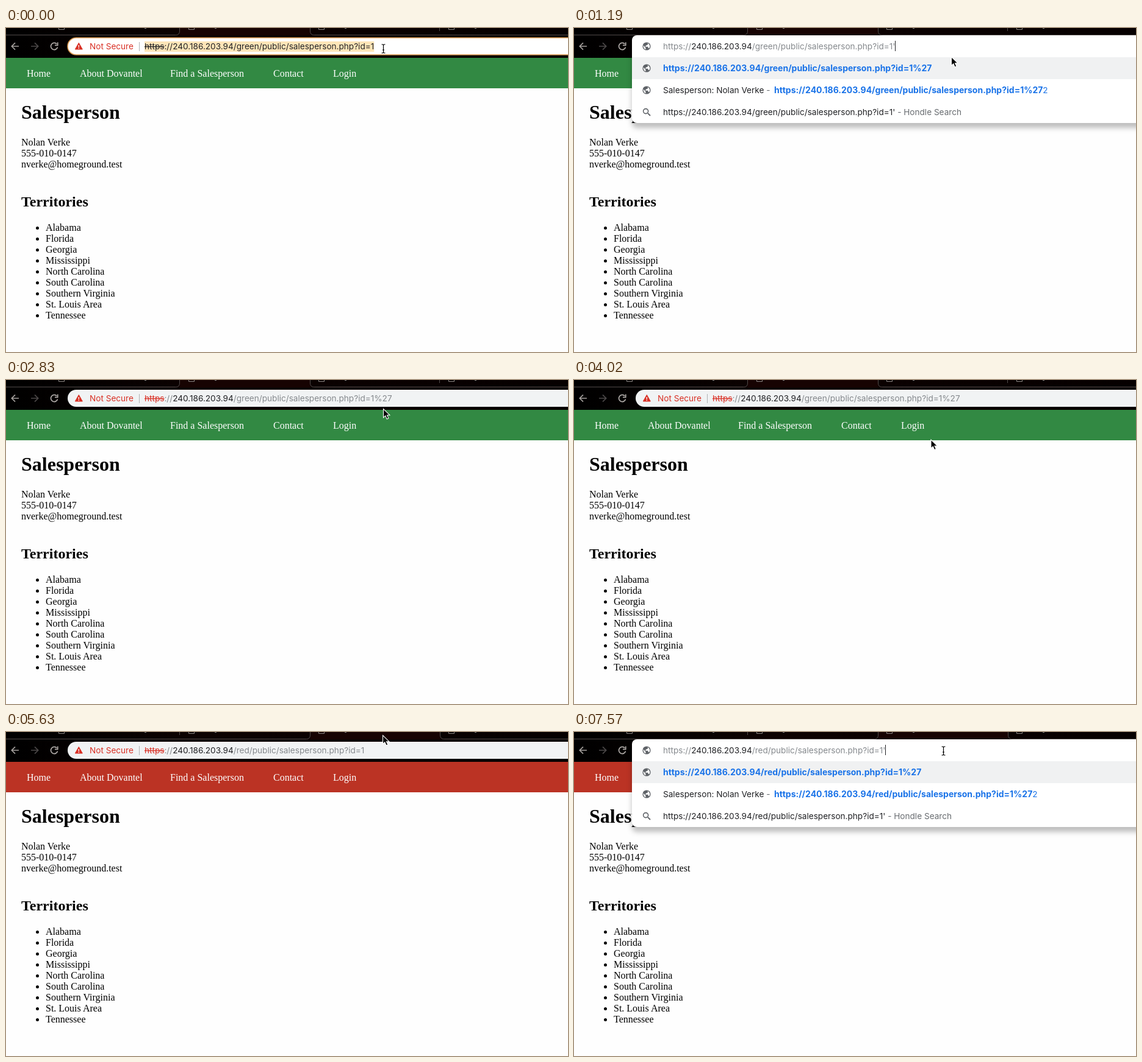
An HTML page for the animation above (8000 ms loop, 921x532 px).

```html
<!DOCTYPE html>
<html lang="en">
<head>
<meta charset="utf-8">
<title>Salesperson</title>
<style>
  html, body { margin: 0; width: 100%; height: 100%; overflow: hidden; background: #fefefe; }
  svg { display: block; }
  text { white-space: pre; }
  .page { font-family: "Liberation Serif", "Times New Roman", serif; font-size: 16px; }
  .ui { font-family: Inter, sans-serif; font-size: 13.6px; }
  .ink { fill: #202124; }
  .dim { fill: #85898d; }
  .note { fill: #686c70; }
  .red { fill: #d93025; }
  .link { fill: #1a73e8; }
  .bold { font-weight: 700; font-size: 14px; }
  .strike { text-decoration: line-through; }
  #popup rect.box { filter: drop-shadow(0 8px 4px rgba(0, 0, 0, .25)); }
</style>
</head>
<body>
<svg width="921" height="532" viewBox="0 0 921 532">
  <defs>
    <linearGradient id="bar">
      <stop offset="0" stop-color="#000"/>
      <stop offset=".35" stop-color="#0d0201"/>
      <stop offset="1" stop-color="#060000"/>
    </linearGradient>
    <g id="globe">
      <circle r="6.6" fill="#5f6368"/>
      <path d="M-5.3 -1.4L-1.6 2.3V5.3C-4 4.7 -5.6 2.4 -5.3 -1.4Z
               M1.6 -5.1C3.6 -4.2 5.3 -2.2 5.3 0C5.3 1.5 4.8 2.7 3.9 3.6
               C3.5 2.9 3.1 2.6 2.4 2.6V.7H-1.9V-.7H-.5V-2H.9C1.6 -2 2 -2.6 2 -3.2Z" fill="#fff"/>
    </g>
  </defs>

  <g id="page" class="page"></g>

  <g id="chrome">
    <rect width="921" height="49" fill="url(#bar)"/>
    <g id="tabs" fill="none" stroke="#504a49"></g>
    <g fill="none" stroke-width="1.7">
      <path d="M21 30H9.5M15 24.3L9.3 30L15 35.7" stroke="#a49f9c"/>
      <path d="M41 30H52.5M47 24.3L52.7 30L47 35.7" stroke="#4c4848"/>
      <path id="reload" d="M83.2 26.2A5.6 5.6 0 1 0 84.5 31.5M84.7 23.6V28.3H80" stroke="#b0aba8"/>
      <path id="stop" d="M73.6 24.6L84.4 35.4M84.4 24.6L73.6 35.4" stroke="#b0aba8"/>
    </g>
  </g>

  <g id="popup" class="ui"></g>

  <g id="pill" class="ui">
    <rect id="field" x="101" y="16" width="850" height="28" rx="14"/>
    <g id="warning">
      <path d="M119.3 24.4L125.3 35H113.3Z" fill="#d93025" stroke="#d93025" stroke-linejoin="round"/>
      <path d="M119.3 28V31.4M119.3 32.5V33.9" stroke="#fff" stroke-width="1.4"/>
      <text class="red" x="137" y="35">Not Secure</text>
      <path d="M218.5 23V38" stroke="#b0b2b5"/>
    </g>
    <g id="info" fill="none" stroke="#5f6368" stroke-width="1.4">
      <circle cx="119" cy="30" r="6"/>
      <path d="M119 29V33.5M119 26.3V27.7"/>
    </g>
    <rect id="selection" x="227" y="22" height="17" fill="#fee5b8"/>
  </g>

  <use id="site" href="#globe" x="119" y="30"/>
  <g class="ui">
    <text id="url" y="35"></text>
    <rect id="caret" y="21" width="1" height="17" fill="#202124"/>
  </g>

  <path id="arrow" d="M0 0V14.2L3.3 11.2L5.7 16.6L8.3 15.4L6 10.2H10.4Z" fill="#000" stroke="#fff" stroke-width="1.1"/>
  <g id="beam" fill="none">
    <path d="M-3 -7H-1L0 -6L1 -7H3M0 -6V6M-3 7H-1L0 6L1 7H3M-1.5 2H1.5" stroke="#fff" stroke-width="2.6" opacity=".75"/>
    <path d="M-3 -7H-1L0 -6L1 -7H3M0 -6V6M-3 7H-1L0 6L1 7H3M-1.5 2H1.5" stroke="#000" stroke-width="1.2"/>
  </g>
</svg>

<script>
const LOOP = 8000;
const HOST = '240.186.203.94';
const PERSON = 'Nolan Verke';
const NAV_COLORS = { green: '#328943', red: '#bb3324' };
const $ = id => document.getElementById(id);

const text = (x, y, body, attrs = '') => `<text x="${x}" y="${y}" ${attrs}>${body}</text>`;
const span = (cls, body) => `<tspan class="${cls}">${body}</tspan>`;
const show = (id, on) => $(id).setAttribute('visibility', on ? 'visible' : 'hidden');
const set = (id, attrs) => {
  for (const name in attrs) $(id).setAttribute(name, attrs[name]);
};

// Each step lists only what changes at that time.
const steps = [
  [0, { site: 'green', mode: 'select', query: '1', popup: 0, caret: 0, busy: 0, cursor: 'beam', at: [618.5, 34] }],
  [140, { mode: 'focus', caret: 1 }],
  [440, { cursor: 'arrow', at: [618.5, 47.5] }],
  [590, { caret: 0 }],
  [1190, { mode: 'type', query: "1'", popup: 1, caret: 1 }],
  [1640, { caret: 0 }],
  [2240, { mode: 'load', query: '1%27', popup: .84, busy: 1 }],
  [2390, { popup: 0 }],
  [2680, { mode: 'rest' }],
  [2830, { busy: 0 }],
  [4020, { at: [585, 98] }],
  [4170, { at: [512, 178] }],
  [4320, { at: [482, 200] }],
  [4610, { at: [500, 168] }],
  [4760, { at: [572, 66] }],
  [4900, { cursor: 'beam', at: [598.5, 31] }],
  [5050, { at: [603, 26] }],
  [5190, { cursor: 'arrow', at: [613, 11] }],
  [5340, { at: [617.5, 5.5] }],
  [5480, { site: 'red', query: '1' }],
  [6070, { at: [617.5, 11.5] }],
  [6370, { cursor: 'beam', at: [610, 27] }],
  [6520, { at: [605.5, 31] }],
  [6670, { mode: 'select' }],
  [6820, { mode: 'focus', caret: 1 }],
  [7270, { caret: 0 }],
  [7570, { mode: 'type', query: "1'", popup: 1, caret: 1 }],
];

const path = (site, query) => `/${site}/public/salesperson.php?id=${query}`;

function buildPage() {
  const links = [[34, 'Home'], [121, 'About Dovantel'], [269, 'Find a Salesperson'], [438, 'Contact'], [536, 'Login']];
  const details = [PERSON, '555-010-0147', 'nverke@homeground.test'];
  const places = ['Alabama', 'Florida', 'Georgia', 'Mississippi', 'North Carolina', 'South Carolina',
    'Southern Virginia', 'St. Louis Area', 'Tennessee'];
  $('page').innerHTML =
    '<rect width="921" height="532" fill="#fefefe"/><rect id="nav" y="49" width="921" height="50"/>' +
    links.map(([x, label]) => text(x, 80, label, 'fill="#fff"')).join('') +
    text(25, 149, 'Salesperson', 'font-size="32" font-weight="700"') +
    details.map((line, i) => text(25, 193 + 18 * i, line)).join('') +
    text(25, 293, 'Territories', 'font-size="24" font-weight="700"') +
    places.map((name, i) =>
      `<circle cx="51.5" cy="${328.5 + 18 * i}" r="2.5"/>` + text(65, 333 + 18 * i, name)).join('');
}

function drawTabs(site) {
  const [left, right] = site === 'green' ? [284.5, 498.5] : [498.5, 711.5];
  const divider = site === 'green' ? 710.5 : 284.5;
  const marks = [91, 304, 517, 730].map(x => `M${x - 4.5} 0V2.5H${x + 4.5}V0`).join('');
  const tails = [227, 342, 555, 768].map(x => `M${x} .5H${x + 3}`).join('');
  $('tabs').innerHTML =
    `<rect x="${left}" width="${right - left}" height="12" fill="#170302" stroke="none"/>` +
    `<path d="M0 11.5H${left - 6}Q${left} 11.5 ${left} 5V0M${right} 0V5Q${right} 11.5 ${right + 6} 11.5H921M${divider} 0V5"/>` +
    `<path d="${marks}${tails}" stroke="#8a8583"/>`;
}

function drawPopup(site) {
  const bold = span('link bold', `https://${HOST}${path(site, '1%27')}`);
  const globe = y => `<use href="#globe" x="119" y="${y}"/>`;
  $('popup').innerHTML =
    '<rect class="box" x="95" y="12" width="850" height="144" rx="8" fill="#fff"/>' +
    '<rect x="95" y="48" width="826" height="36" fill="#f0f1f2"/>' +
    globe(66) + globe(102) +
    text(146, 71, bold) +
    text(146, 107, span('ink', `Salesperson: ${PERSON}`) + span('note', ' -')) +
    text(328, 107, bold + span('link', '2')) +
    text(146, 143, span('ink', `https://${HOST}${path(site, "1'")}`) + span('note', ' - Hondle Search')) +
    '<path d="M121 140L125 144" stroke="#5f6368" stroke-width="1.8"/>' +
    '<circle cx="117.6" cy="136.6" r="4" fill="none" stroke="#5f6368" stroke-width="1.6"/>';
}

function drawUrl({ mode, site, query }) {
  const tail = path(site, query);
  const plain = span('dim', 'https://');
  const struck = span('red strike', 'https') + span('dim', '://');
  const start = { type: 146, load: 135 }[mode] || 227;
  $('url').setAttribute('x', start);
  $('url').innerHTML = mode === 'select'
    ? span('ink strike', 'https') + span('ink', `://${HOST}${tail}`)
    : (start === 227 ? struck : plain) + span('ink', HOST) + span('dim', tail);
  const width = $('url').getComputedTextLength();
  set('selection', { width });
  set('caret', { x: Math.round(start + width) });
}

function draw(s) {
  const { mode } = s;
  const focused = mode === 'select' || mode === 'focus';
  const typing = mode === 'type';
  set('nav', { fill: NAV_COLORS[s.site] });
  drawTabs(s.site);
  drawPopup(s.site);
  drawUrl(s);
  set('popup', { opacity: s.popup });
  set('field', {
    fill: focused ? '#fff' : '#f1f3f4',
    stroke: focused ? '#d9984f' : mode === 'load' ? '#fafafa' : 'none',
    'stroke-width': focused ? 1.6 : 1,
  });
  show('field', !typing);
  show('site', typing);
  show('warning', focused || mode === 'rest');
  show('info', mode === 'load');
  show('selection', mode === 'select');
  show('caret', s.caret);
  show('reload', !s.busy);
  show('stop', s.busy);
  for (const id of ['arrow', 'beam']) show(id, s.cursor === id);
  set(s.cursor, { transform: `translate(${s.at})` });
}

let current = -1;
function tick() {
  const t = performance.now() % LOOP;
  const index = steps.filter(([time]) => time <= t).length - 1;
  if (index !== current) {
    current = index;
    draw(Object.assign({}, ...steps.slice(0, index + 1).map(step => step[1])));
  }
  requestAnimationFrame(tick);
}

buildPage();
tick();
</script>
</body>
</html>
```
